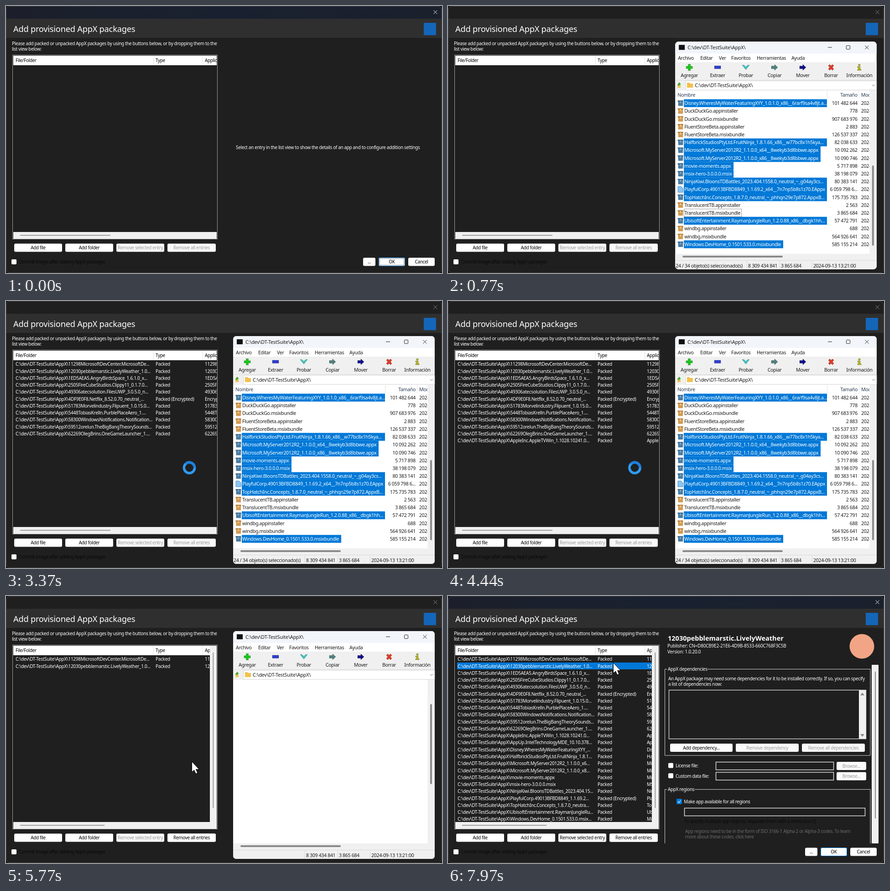
An HTML page that plays this animation: 956 px wide and 586 px high, repeating every 8000 ms.

```html
<!DOCTYPE html>
<html lang="en">
<head>
<meta charset="utf-8">
<title>Add provisioned AppX packages</title>
<style>
html, body { margin: 0; height: 100%; overflow: hidden; background: #141414; }
svg { display: block; width: 956px; height: 586px; }
text { font: 10px "Noto Sans", "Open Sans", sans-serif; letter-spacing: -.36px; fill: #fff; }
.row text { letter-spacing: -.28px; }
.k { fill: #000; }
.off { fill: #9a9a9a; }
.dim { fill: #090909; }
.etched { fill: #6b6b6b; }
.code { letter-spacing: -.22px; }
.head { font-size: 18.2px; letter-spacing: -.2px; }
.app { font-size: 14.5px; font-weight: 700; letter-spacing: 0; }
.z text { font-size: 10.6px; letter-spacing: -.35px; fill: #1b1b1b; }
.z .path { font-size: 10.8px; letter-spacing: -.2px; }
.z .w { fill: #fff; }
.z .col { fill: #2a3b55; }
.mid { text-anchor: middle; }
.end { text-anchor: end; }
</style>
</head>
<body>
<svg id="stage" viewBox="0 0 956 586"></svg>
<script>
const LOOP = 8000;
const DIR = 'C:\\dev\\DT-TestSuite\\AppX\\';
const BLUE = '#0078d7', BAR = '#f0f0f0', THUMB = '#8a8a8a';

// Drawing helpers
const text = (x, y, s, cls = '') => `<text x="${x}" y="${y}" class="${cls}">${s}</text>`;
const rect = (x, y, w, h, fill, more = '') =>
  `<rect x="${x}" y="${y}" width="${w}" height="${h}" fill="${fill}" ${more}/>`;
const frame = (x, y, w, h, color, more = '') =>
  rect(x + .5, y + .5, w - 1, h - 1, 'none', `stroke="${color}" ${more}`);
const path = (d, fill, more = '') => `<path d="${d}" fill="${fill}" ${more}/>`;
const line = (d, color, width = 1) => path(d, 'none', `stroke="${color}" stroke-width="${width}"`);
const group = (id, body, more = '') => `<g id="${id}" ${more}>${body}</g>`;
const button = (x, y, w, label, on = true) =>
  rect(x, y + .5, w, 18, on ? '#fff' : '#fafafa', 'rx="3"') +
  text(x + w / 2, y + 13.2, label, 'mid ' + (on ? 'k' : 'off'));
const dotted = (x, y, w, h) => frame(x, y, w, h, '#333', 'stroke-dasharray="1 1"');
const checkbox = (x, y) => rect(x, y, 11, 11, '#fff', 'rx="2"');

// Package list: name, optional application text
const packages = `11298MicrosoftDevCenter.MicrosoftDe...
12030pebblemarstic.LivelyWeather_1.0...
1ED5AEA5.AngryBirdsSpace_1.6.1.0_x...
2505FireCubeStudios.Clippy11_0.1.7.0...
49306atecsolution.FilesUWP_3.0.5.0_n...
4DF9E0F8.Netflix_8.52.0.70_neutral_...|Encrypt
51783Morvelindustry.Flipuent_1.0.15.0...
5448TobiasKrelln.PurblePlaceAero_1....
58300WindowsNotifications.Notification...
59512orelun.TheBigBangTheorySounds...
62269OlegBrins.OneGameLauncher_1....
AppleInc.AppleTVWin_1.1028.10241.0...
AppUp.IntelTechnologyMDE_10.10.378...
Disney.WheresMyWaterFeaturingXYY_...
HalfbrickStudiosPtyLtd.FruitNinja_1.8.1...
Microsoft.MyServer2012R2_1.1.0.0_x6...
Microsoft.MyServer2012R2_1.1.0.0_x8...
movie-moments.appx|Microso
msix-hero-3.0.0.0.msix|MSIX He
NinjaKiwi.BloonsTDBattles_2023.404.15...
PlayfulCorp.49013BFBD8849_1.1.69.2...|Playful
TopHatchInc.Concepts_1.8.7.0_neutra...
UbisoftEntertainment.RaymanJungleRu...
Windows.DevHome_0.1501.533.0.msix...|Microso`.split('\n');

const packageRow = (entry, i) => {
  const [name, app = name.slice(0, 7)] = entry.split('|');
  const y = (142.2 + 15.27 * i).toFixed(1);
  const type = i === 5 || i === 20 ? 'Packed (Encrypted)' : 'Packed';
  return `<g class="row">${text(21, y, DIR + name) + text(328, y, type) + text(436, y, app)}</g>`;
};

// File manager lists: name, size, right edge of the highlight
const selectedFiles = `Disney.WheresMyWaterFeaturingXYY_1.0.1.0_x86__6rarf9sa4v8jt.a...|101 482 644|831
DuckDuckGo.appinstaller|778
DuckDuckGo.msixbundle|907 683 976
FluentStoreBeta.appinstaller|2 883
FluentStoreBeta.msixbundle|126 537 337
HalfbrickStudiosPtyLtd.FruitNinja_1.8.1.66_x86__w77bc8x1h5kya...|82 038 633|831
Microsoft.MyServer2012R2_1.1.0.0_x64__8wekyb3d8bbwe.appx|10 092 262|817
Microsoft.MyServer2012R2_1.1.0.0_x86__8wekyb3d8bbwe.appx|10 090 746|817
movie-moments.appx|5 717 898|626
msix-hero-3.0.0.0.msix|38 198 079|626
NinjaKiwi.BloonsTDBattles_2023.404.1558.0_neutral_~_g04ay3cs...|80 383 141|831
PlayfulCorp.49013BFBD8849_1.1.69.2_x64__7n7np5b8s1z70.EAppx|6 059 798 6...|831
TopHatchInc.Concepts_1.8.7.0_neutral_~_phhqn29e7p872.AppxB...|175 735 783|831
TranslucentTB.appinstaller|2 563
TranslucentTB.msixbundle|3 865 684
UbisoftEntertainment.RaymanJungleRun_1.2.0.88_x86__dbgk1hh...|57 472 791|831
windbg.appinstaller|688
windbg.msixbundle|564 926 641
Windows.DevHome_0.1501.533.0.msixbundle|585 155 214|735`;

const allFiles = `4DF9E0F8.Netflix_8.52.0.70_neutral_~_mcm4njqhnhss8.Emsixbun...|105 835 286
2505FireCubeStudios.Clippy11_0.1.7.0_x64__k45w5yt88e21j.msix|100 800 843
5448TobiasKrelln.PurblePlaceAero_1.0.0.0_x64__mzjk1s65q081...|33 975 823
11298MicrosoftDevCenter.MicrosoftDevPortal_1.1.11.0_neutral_~...|21 301 383
12030pebblemarstic.LivelyWeather_1.0.20.0_neutral_~_97hta09m...|51 257 577
49306atecsolution.FilesUWP_3.0.5.0_neutral_~_et10x9a9vyk8t.Msi...|249 129 536
51783Morvelindustry.Flipuent_1.0.15.0_neutral_~_3x3d152xy9q6t...|190 727 126
58300WindowsNotifications.NotificationsVisualizer_5.0.2.0_neutr...|25 405 882
59512orelun.TheBigBangTheorySoundsQuotes_1.8.3.19_neutral__j...|23 219 343
62269OlegBrins.OneGameLauncher_1.5.0.0_neutral_~_gghb1w55...|20 447 097
AppleInc.AppleTVWin_1.1028.10241.0_neutral_~_nzyj5cx40ttqa....|197 779 378
AppUp.IntelTechnologyMDE_10.10.3783.0_neutral_~_8j3eq9eme...|32 734 588
Disney.WheresMyWaterFeaturingXYY_1.0.1.0_x86__6rarf9sa4v8jt.a...|101 482 644
DuckDuckGo.appinstaller|778
DuckDuckGo.msixbundle|907 683 976
FluentStoreBeta.appinstaller|2 883
FluentStoreBeta.msixbundle|126 537 337
HalfbrickStudiosPtyLtd.FruitNinja_1.8.1.66_x86__w77bc8x1h5kya...|82 038 633
Microsoft.MyServer2012R2_1.1.0.0_x64__8wekyb3d8bbwe.appx|10 092 262
Microsoft.MyServer2012R2_1.1.0.0_x86__8wekyb3d8bbwe.appx|10 090 746`;

const fileIcon = (y, page, picked) => page
  ? path(`M504 ${y - 6.5}h7l4 4v9h-11z`, picked ? '#8cc4f0' : '#fff', `stroke="${picked ? '#4a90c8' : '#999'}"`)
  : rect(504.5, y - 5, 10.5, 11, picked ? '#4a7ba0' : '#d29a50') +
    rect(503.5, y - 6, 12, 3, picked ? '#39698f' : '#b9803a') +
    rect(508, y - 4, 3.5, 4, picked ? '#7fa5c0' : '#ecc88e');

const fileRow = (entry, i) => {
  const [name, size, edge] = entry.split('|');
  const y = 212 + 17.22 * i, base = (y + 4).toFixed(1);
  return fileIcon(y, /EAppx|Emsix/.test(name), edge) +
    (edge ? rect(517, (y - 8.6).toFixed(1), edge - 517, 17.3, BLUE) : '') +
    text(518, base, name, edge ? 'w' : '') + text(898, base, size, 'end') + text(906, base, '2024-09');
};

const fileList = (id, files, more) => group(id,
  `<g clip-path="url(#files)">${text(503, 198, 'Nombre', 'col') + text(898, 198, 'Tamaño', 'end col') +
  text(906, 198, 'Modificado', 'col') + line('M831.5 185v18M901.5 185v18', '#e2e2e2') +
  files.split('\n').map(fileRow).join('') + more}</g>`);

const arrowIcon = 'M-7-3h7v-3.5l7 6.5-7 6.5v-3.5h-7z';
const tools = [
  ['Agregar', 529, 'M-2.5-7h5v4.5h4.5v5h-4.5v4.5h-5v-4.5h-4.5v-5h4.5z', '#18c818'],
  ['Extraer', 591, 'M-7-3.5h14v6.5h-14z', '#2b3fd0'],
  ['Probar', 653, 'M-8-5h4l4 4 4-4h4l-8 10z', '#3cc6c0'],
  ['Copiar', 716, arrowIcon, '#4f8080'],
  ['Mover', 778, arrowIcon, '#10108c'],
  ['Borrar', 840, 'M-6-3.5l3-3 3 3 3-3 3 3-3 3.5 3 3.5-3 3-3-3-3 3-3-3 3-3.5z', '#e03a28'],
  ['Información', 902, 'M-2-7h4v3.5h-4zM-4-2h6v6h2v2.5h-8v-2.5h2v-3.5h-2z', '#b4b414']
];
const menus = [['Archivo', 504], ['Editar', 553], ['Ver', 594], ['Favoritos', 621], ['Herramientas', 677], ['Ayuda', 753]];

const fileManager = group('zip',
  rect(498, 77, 442, 500, '#fff', 'rx="7"') +
  path('M498 103v-19a7 7 0 0 1 7-7h428a7 7 0 0 1 7 7v19z', '#f2f5fa') +
  rect(506, 84, 13, 11, '#111') + text(525, 93.5, DIR, 'path') +
  line('M833 89.5h9M914.5 85.5l8 8M922.5 85.5l-8 8', '#222') + frame(873, 85, 9, 9, '#222', 'rx="1"') +
  menus.map(([s, x]) => text(x, 116.5, s)).join('') +
  rect(498, 122, 442, 62, BAR) +
  tools.map(([s, x, d, c]) => path(d, c, `transform="translate(${x} 133.5)" stroke="#0005" stroke-width=".8"`) +
    text(x, 155, s, 'mid')).join('') +
  line('M498 161.5h442', '#dcdcdc') +
  path('M503 171l4-5 4 5h-2.5v6h-4z', '#4aa832') + rect(503, 173, 7, 5, '#e8c454') +
  rect(521, 163, 419, 20, '#fff', 'stroke="#c8c8c8" stroke-width=".7"') +
  path('M524 167h5l2 2h6v9h-13z', '#f2c14e') + text(541, 177, DIR, 'path') +
  line('M930 171.5l3 3 3-3', '#666') +
  rect(924.5, 184, 15.5, 359, BAR) + rect(498, 543, 442, 14, BAR) +
  path('M498 557h442v13a7 7 0 0 1-7 7h-428a7 7 0 0 1-7-7z', BAR) +
  rect(514, 547, 220, 4, THUMB, 'rx="2"') + rect(930, 237, 4, 176, THUMB, 'id="thumb" rx="2"') +
  line('M498 557.5h442M655.5 559v17M727.5 559v17M798.5 559v17', '#d8d8d8') +
  fileList('picked', selectedFiles, group('focusOld', dotted(517, 444, 127, 18))) +
  fileList('fresh', allFiles, dotted(517, 513, 300, 18)) +
  group('count24', text(499, 573, '24 / 34 objeto(s) seleccionado(s)')) +
  group('count0', text(499, 573, '0 / 34 objeto(s) seleccionado(s)')) +
  group('sizes', text(658, 573, '8 309 434 841') + text(730, 573, '3 865 684') + text(801, 573, '2024-09-13 13:21:00')),
  'class="z"');

const fileBox = (y, label) => checkbox(483, y + 2.5) + text(499, y + 12, label) +
  frame(587, y, 259, 18, '#e8e8e8', 'stroke-width="1.4"') + button(852, y - .5, 65, 'Browse...', false);

const details = group('details',
  text(482, 97.5, '12030pebblemarstic.LivelyWeather', 'app') +
  text(481, 113, 'Publisher: CN=D80CB9E2-21E6-4D9B-8533-660C768F3C5B', 'code') +
  text(481, 125.5, 'Version: 1.0.20.0', 'code') +
  '<circle cx="907.5" cy="110.5" r="27" fill="#f2a586"/>' +
  line('M480 160.5h-4.5v189.5h450.5v-189.5h-357', '#d4d4d4') + text(482, 163.5, 'AppX dependencies') +
  text(483, 185, 'An AppX package may need some dependencies for it to be installed correctly. If so, you can specify') +
  text(483, 197, 'a list of dependencies now:') +
  frame(484, 206, 433, 108, '#d4d4d4', 'stroke-width="1.4"') + rect(901, 207, 15, 106, BAR) +
  path('M904 218l4.5-6 4.5 6zM904 303l4.5 6 4.5-6z', THUMB) +
  button(487, 323.5, 137, 'Add dependency...') + button(631, 323.5, 138, 'Remove dependency', false) +
  button(776, 323.5, 138, 'Remove all dependencies', false) +
  fileBox(364, 'License file:') + fileBox(386.5, 'Custom data file:') +
  line('M480 424.5h-4.5v118.5M541 424.5h385v118.5', '#d4d4d4') + text(482, 427.5, 'AppX regions') +
  rect(501, 445, 12, 12, BLUE, 'rx="2"') + line('M504 451l2.5 2.5 4-5', '#fff', 1.2) +
  text(517, 455, 'Make app available for all regions') +
  frame(518, 465, 397, 18, '#e8e8e8', 'stroke-width="1.4"') +
  text(518, 498, 'To specify multiple app regions, separate them with a semicolon (;)', 'dim') +
  text(520, 520, 'App regions need to be in the form of ISO 3166-1 Alpha 2 or Alpha-3 codes. To learn', 'etched') +
  text(520, 531.5, 'more about these codes, click here', 'etched') +
  rect(929, 151, 15, 392, BAR) + rect(936, 166, 2, 322, THUMB));

stage.innerHTML = `<defs>
  <clipPath id="files"><rect x="498" y="184" width="426" height="358"/></clipPath>
  <clipPath id="list"><rect x="16" y="109" width="446" height="387"/></clipPath>
  <linearGradient id="mica"><stop stop-color="#1c1f2b"/><stop offset=".5" stop-color="#192130"/><stop offset="1" stop-color="#1b202d"/></linearGradient>
  </defs>` +
  rect(.5, .5, 955, 585, '#1f1f1f', 'rx="8"') +
  group('active', path('M1 28v-20a7 7 0 0 1 7-7h940a7 7 0 0 1 7 7v20z', 'url(#mica)')) +
  rect(1, 28, 954, 42, '#2f2f2f') + frame(0, 0, 956, 586, '#454545', 'rx="8"') +
  path('M937.5 9.5l8 8M945.5 9.5l-8 8', 'none', 'id="close"') +
  text(16, 57, 'Add provisioned AppX packages', 'head') +
  rect(916, 37, 27, 27, '#1466b8') +
  text(13, 86, 'Please add packed or unpacked AppX packages by using the buttons below, or by dropping them to the') +
  text(13, 97.5, 'list view below:') +
  frame(14, 107, 450, 405, '#a0a0a0') + rect(16, 109, 446, 21, '#fff') + rect(16, 496, 446, 15, BAR) +
  rect(31, 502.5, 198, 1.6, THUMB) + line('M323.5 109v21M431.5 109v21', '#e2e2e2') +
  `<g clip-path="url(#list)">${text(21, 123, 'File/Folder', 'k') + text(328, 123, 'Type', 'k') +
    text(436, 123, 'Application name', 'k') + rect(20, 146, 427, 15, BLUE, 'id="mark"') +
    packages.map(packageRow).join('')}</g>` +
  button(18, 521, 105, 'Add file') + button(130, 521, 105, 'Add folder') +
  button(242, 521, 105, 'Remove selected entry', false) + button(354, 521, 106, 'Remove all entries', false) +
  group('filled', rect(447, 109, 15, 402, BAR) + rect(453.5, 124, 1.6, 341, THUMB) +
    rect(216, 501, 14, 5, BAR) + button(354, 521, 106, 'Remove all entries')) +
  group('chosen', button(242, 521, 105, 'Remove selected entry')) +
  checkbox(12, 556) + text(28, 565, 'Commit image after adding AppX packages', 'dim') +
  button(783, 552, 27, '...') + button(817, 552, 58, 'OK') + button(882, 552, 58, 'Cancel') +
  frame(817, 552, 58, 19, BLUE, 'rx="3"') + group('okFocus', dotted(819, 554, 54, 15)) +
  group('hint', text(504, 314, 'Select an entry in the list view to show the details of an app and to configure addition settings')) +
  details + fileManager +
  group('arrow', path('M.5.5V23.5L5.5 19 9 27 13 25.3 9.6 17.5H16.5Z', '#fff', 'stroke="#000"')) +
  group('ring', '<circle r="11.7" fill="none" stroke="#2e9bf2" stroke-width="5.4"/>' +
    line('M-8.3-8.3A11.7 11.7 0 0 1 11.7 0', '#1d7fdc', 5.4));

// Pointer moves: start, end, then a quadratic curve
const moves = [
  [970, 1400, 650, 586, 660, 400, 613, 316],
  [1540, 1900, 613, 316, 480, 330, 350.5, 365.5],
  [2640, 3370, 350.5, 365.5, 375, 366, 402, 366],
  [3600, 4040, 402, 366, 406, 366, 409.5, 366],
  [5770, 5771, 407, 363, 407, 363, 407, 363],
  [6170, 6740, 407, 363, 440, 250, 359, 139],
  [6870, 6900, 359, 139, 359, 139, 358, 139],
  [7040, 7400, 358, 139, 358, 140, 360, 142],
  [7640, 7670, 360, 142, 361, 144, 362, 146]
];
// The list is cleared and refilled for each package: time, visible rows
const fills = [
  [0, 0], [2040, 1], [2140, 2], [2200, 3], [2270, 4], [2640, 5], [2770, 6], [2870, 0], [2900, 7], [3000, 8],
  [3130, 9], [3270, 10], [3370, 11], [3600, 12], [3700, 0], [3730, 13], [3830, 14], [4040, 15], [4240, 16],
  [4440, 12], [4470, 2], [4500, 17], [4540, 18], [4740, 19], [5000, 13], [5040, 20], [5270, 18], [5300, 21],
  [5440, 22], [5500, 17], [5540, 23], [5770, 2], [5800, 24]
];

const el = id => document.getElementById(id);
const show = (node, on) => { node.style.display = on ? '' : 'none'; };
const rows = [...document.querySelectorAll('.row')];
const latest = (track, t) => track.filter(k => k[0] <= t).pop();

function pointer(t) {
  const move = latest(moves, t);
  if (!move) return null;
  const [a, b, x0, y0, cx, cy, x1, y1] = move;
  const p = Math.min(1, (t - a) / (b - a)), s = p * p * (3 - 2 * p), q = 1 - s;
  return [q * q * x0 + 2 * q * s * cx + s * s * x1, q * q * y0 + 2 * q * s * cy + s * s * y1];
}

function draw(t) {
  const open = t >= 500 && t < 7040, busy = t >= 1870 && t < 5770, at = pointer(t);
  const states = {
    active: !open, zip: open, okFocus: t < 500, focusOld: t < 1540,
    picked: t < 5770, count24: t < 5770, sizes: t < 5800, fresh: t >= 5800, count0: t >= 5800,
    filled: t >= 5770, mark: t >= 7940, chosen: t >= 7940, hint: t < 7940, details: t >= 7970,
    arrow: at && !busy, ring: at && busy
  };
  for (const id in states) show(el(id), states[id]);
  el('close').setAttribute('stroke', open ? '#8a8a8a' : '#fff');
  el('thumb').setAttribute('y', t < 5770 ? 349 : 237);

  const left = (1 - Math.min(1, Math.max(0, (t - 500) / 320))) ** 3;
  el('zip').setAttribute('transform',
    `translate(719 ${577 + 250 * left}) scale(${1 - .25 * left}) translate(-719 -577)`);
  el('zip').setAttribute('opacity', Math.min(1, Math.max(0, (t - 500) / 160)));

  const count = latest(fills, t)[1];
  rows.forEach((row, i) => show(row, i < count));
  if (at) el(busy ? 'ring' : 'arrow').setAttribute('transform', `translate(${at})`);
}

function tick() {
  draw(performance.now() % LOOP);
  requestAnimationFrame(tick);
}
tick();
</script>
</body>
</html>
```
